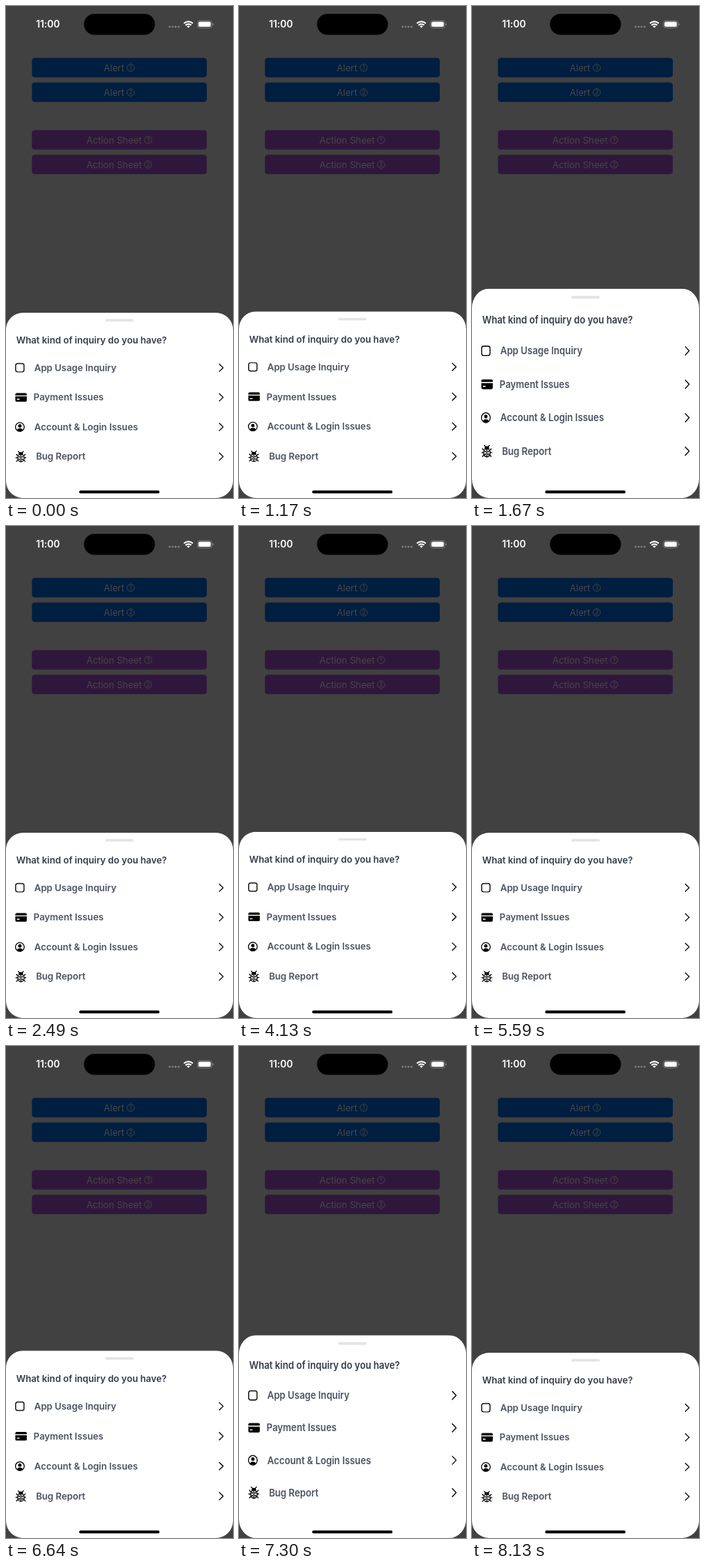
Animation, 295 px wide and 640 px high, one loop 8.81 s. Source, as an HTML page:

```html
<!DOCTYPE html>
<html lang="en">
<head>
<meta charset="utf-8">
<title>Action sheet</title>
<style>
  html, body { margin: 0; width: 100%; height: 100%; overflow: hidden; background: #414141; }
  svg { display: block; width: 295px; height: 640px; }
  text { font-family: Inter, Roboto, sans-serif; font-size: 12px; letter-spacing: -.03px; }
  .button { fill: #474747; }
  .digit { font-size: 8px; text-anchor: middle; letter-spacing: 0; }
  .title { font-weight: 600; fill: #343b49; }
  .row { font-weight: 600; fill: #4b5262; }
  .line { fill: none; stroke: #000; stroke-width: 1.2; stroke-linecap: round; stroke-linejoin: round; }
  #sheet { transform-origin: 0 640px; }
</style>
</head>
<body>
<svg viewBox="0 0 295 640">
  <rect width="295" height="640" fill="#414141"/>
  <g id="buttons"></g>

  <rect x="101.3" y="10.2" width="92.3" height="27.2" rx="13.6"/>
  <text x="39" y="28.3" fill="#fff" font-weight="600" style="font-size:12.6px">11:00</text>
  <path d="M212.6 27h13" stroke="#818181" stroke-width="2.6" stroke-linecap="round" stroke-dasharray="0 3.9"/>
  <g fill="none" stroke="#fff" stroke-width="1.9">
    <path d="M231.2 22.6a8.2 8.2 0 0 1 11.6 0"/>
    <path d="M233.3 25a5.2 5.2 0 0 1 7.4 0"/>
  </g>
  <path d="M237 28.6l-2-2.1a2.9 2.9 0 0 1 4 0z" fill="#fff"/>
  <rect x="248.8" y="19.2" width="18.6" height="9.2" rx="2.9" fill="none" stroke="#8c8c8c" stroke-width=".8"/>
  <rect x="250.1" y="20.5" width="16" height="6.6" rx="1.8" fill="#fff"/>
  <path d="M268.6 22.3q1.3 .5 1.3 1.5t-1.3 1.5z" fill="#8c8c8c"/>

  <g id="sheet">
    <rect y="399" width="295" height="241" rx="22" fill="#fff"/>
    <rect x="129" y="407.3" width="37" height="3.2" rx="1.6" fill="#e4e4e4"/>
    <text class="title" x="13.2" y="439.2">What kind of inquiry do you have?</text>
    <g id="rows"></g>
  </g>

  <rect x="95" y="630.2" width="104.6" height="3.8" rx="1.9"/>
</svg>
<script>
  const LOOP = 8810, BOTTOM = 640, REST = 399, CENTER = 147.3;

  const button = (label, half, n, y, fill) => `
    <g transform="translate(${CENTER} ${y})">
      <rect x="-113.6" width="227.2" height="25.2" rx="4" fill="${fill}"/>
      <text class="button" x="${-half}" y="17">${label}</text>
      <circle cx="${half - 5.5}" cy="12.7" r="4.7" fill="none" stroke="#474747" stroke-width=".9"/>
      <text class="button digit" x="${half - 5.5}" y="15.6">${n}</text>
    </g>`;
  const pair = (label, half, y, fill) =>
    [1, 2].map(n => button(label, half, n, y + (n - 1) * 32, fill)).join("");
  document.getElementById("buttons").innerHTML =
    pair("Alert", 20.3, 67.6, "#001e40") + pair("Action Sheet", 42.8, 161.5, "#2f173c");

  // Icons are drawn around the row's centre line.
  const mirror = shape => shape + `<g transform="translate(38.6 0) scale(-1 1)">${shape}</g>`;
  const icons = {
    square: `<rect class="line" x="12.6" y="-5.4" width="10.8" height="10.8" rx="2.4"/>`,
    card: `<rect x="12.2" y="-5.6" width="14.8" height="11.2" rx="1.6"/>
      <path d="M12.2 -2h14.8M14.2 2.4h3.4" stroke="#fff" stroke-width="1.3"/>`,
    person: `<circle class="line" cx="18" r="5.7"/>
      <circle cx="18" cy="-1.3" r="2.2"/>
      <path d="M14 3.9q1 -2.2 4 -2.2t4 2.2q-1.7 1.5 -4 1.5t-4 -1.5z"/>`,
    bug: `<path d="M16.2 -2.7a3.1 3.1 0 0 1 6.2 0z"/>
      <ellipse class="line" cx="19.3" cy="1.9" rx="4.3" ry="4.8"/>
      <path class="line" d="M19.3 -2.6v9"/>` +
      mirror(`<path class="line" d="M17.4 -5.2l-1.4 -1.6M15.2 -1.4l-1.7 -1.4M14.8 1.6h-1.9M15.3 4.6l-1.6 1.6"/>
        <circle cx="17.2" cy=".4" r="1"/><circle cx="17.2" cy="3.6" r="1"/>`)
  };
  const rows = [
    ["square", "App Usage Inquiry", 36.7],
    ["card", "Payment Issues", 35.8],
    ["person", "Account &amp; Login Issues", 36.8],
    ["bug", "Bug Report", 38.9]
  ];
  document.getElementById("rows").innerHTML = rows.map(([icon, label, x], i) => `
    <g transform="translate(0 ${470.6 + i * 38.5})">
      ${icons[icon]}
      <text class="row" x="${x}" y="4.3">${label}</text>
      <path class="line" d="M277.2 -4.8l5 4.8l-5 4.8"/>
    </g>`).join("");

  // The sheet is stretched from its bottom edge, in short steps along an eased path.
  const ease = p => (1 - Math.cos(Math.PI * p)) / 2;
  const pose = (time, top) => ({
    offset: time / LOOP,
    transform: `scaleY(${(BOTTOM - top) / (BOTTOM - REST)})`,
    easing: "step-end"
  });
  const move = (start, end, from, to) => {
    const count = Math.round((end - start) / 115) + 1;
    return Array.from({ length: count }, (_, i) =>
      pose(start + (end - start) * i / (count - 1), from + (to - from) * ease((i + 1) / count)));
  };
  const pull = (start, held, top, release, end) =>
    [...move(start, held, REST, top), ...move(release, end, top, REST)];

  document.getElementById("sheet").animate([
    pose(0, REST),
    ...pull(1050, 1780, 366, 2270, 2490),
    ...pull(4130, 5040, 359, 5150, 5590),
    ...pull(6520, 7410, 375.5, 7560, 8130),
    pose(LOOP, REST)
  ], { duration: LOOP, iterations: Infinity });
</script>
</body>
</html>
```
